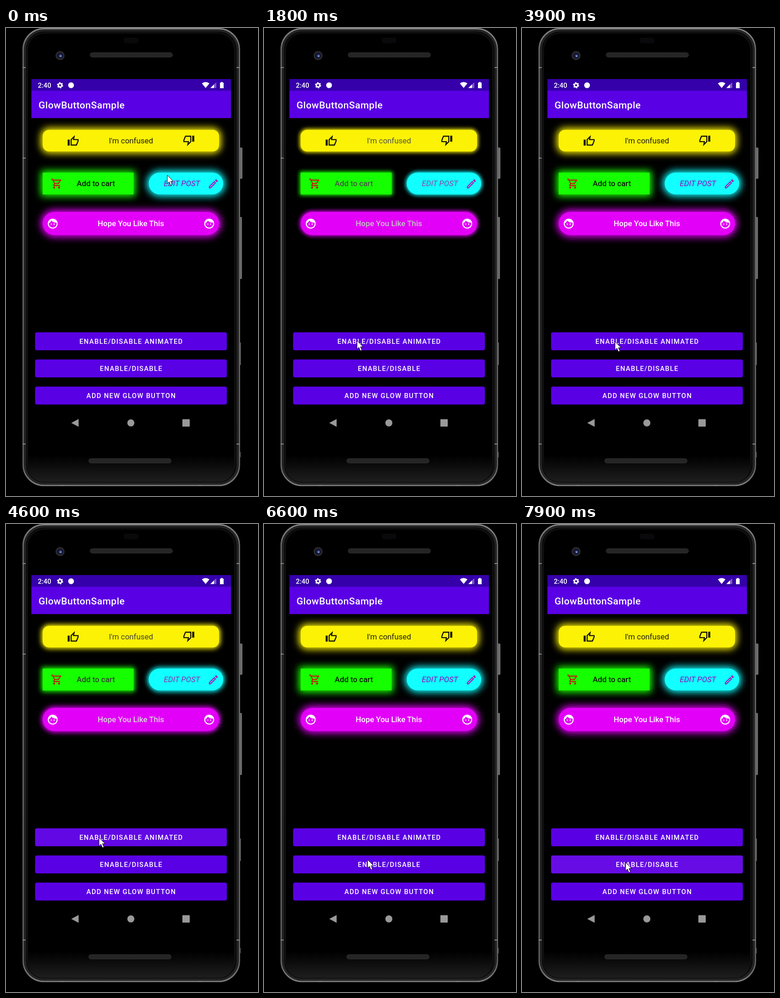
Write an HTML page that moves like this. It is 550 by 1018 pixels and loops after 8 s.

```html
<!DOCTYPE html>
<html lang="en">
<head>
<meta charset="utf-8">
<title>Glow buttons</title>
<style>
  html, body { margin: 0; width: 100%; height: 100%; overflow: hidden; background: #000; }
  svg { display: block; width: 550px; height: 1018px; }
  text { font-family: Roboto, sans-serif; white-space: pre; }
  .medium { font-weight: 500; }
  .caps { font-size: 14.8px; font-weight: 500; letter-spacing: 1.32px; fill: #fff; }
  .label { font-size: 16.9px; text-anchor: middle; }
  .line { fill: none; stroke: currentColor; stroke-width: 2; }
  .solid { fill: currentColor; }
</style>
</head>
<body>
<svg id="stage" viewBox="0 0 550 1018">
  <defs>
    <linearGradient id="chin" x1="0" y1="0" x2="0" y2="1">
      <stop offset="0" stop-color="#000"/>
      <stop offset="1" stop-color="#1f1e1f"/>
    </linearGradient>
    <linearGradient id="rim" x1="0" y1="0" x2="0" y2="1">
      <stop offset="0" stop-color="#858587"/>
      <stop offset=".05" stop-color="#666668"/>
      <stop offset=".95" stop-color="#5e5e60"/>
      <stop offset="1" stop-color="#7c7c7e"/>
    </linearGradient>
    <pattern id="mesh" width="4" height="4" patternUnits="userSpaceOnUse">
      <rect width="4" height="4" fill="#1a1a1a"/>
      <path d="M0 0h2v2H0zM2 2h2v2H2z" fill="#303030"/>
    </pattern>
    <g id="thumb">
      <path class="solid" d="M1 9h4v12H1z"/>
      <path class="line" d="M8 9l6-6-1.2 6H22v3l-3.3 8H8z"/>
    </g>
    <g id="cart">
      <path class="line" d="M1 3h2.6L8 12h7.5L20 5H5M8 12l-1.8 3.2q-.3.8.8.8h12"/>
      <circle class="solid" cx="7" cy="20" r="2"/>
      <circle class="solid" cx="17" cy="20" r="2"/>
    </g>
    <g id="pencil">
      <path class="line" d="M4 20v-2.3L14 7.6l2.3 2.3L6.3 20z"/>
      <path class="solid" d="M15.1 5.1L17 3.2q.7-.5 1.4 0l2.3 2.3q.6.7 0 1.4l-1.8 1.9z"/>
    </g>
    <g id="face">
      <circle class="line" cx="12" cy="12" r="9"/>
      <path class="solid" d="M3 11.500Q7.500 10 9.300 5.800q3.500 5.200 11 3.900A9 9 0 0 0 3 11.500z"/>
      <circle class="solid" cx="9" cy="13" r="1.25"/>
      <circle class="solid" cx="15" cy="13" r="1.25"/>
    </g>
  </defs>

  <!-- phone body -->
  <g fill="#6c6c6e">
    <rect x="509" y="260" width="7" height="68" rx="2"/>
    <rect x="509" y="411" width="6" height="135" rx="2"/>
    <rect x="509" y="684" width="3.5" height="49" rx="1"/>
    <rect x="509" y="922" width="3" height="12" rx="1"/>
  </g>
  <rect x="37.500" y="1.500" width="472" height="993.500" rx="45" fill="#0b0b0c" stroke="url(#rim)" stroke-width="3"/>
  <rect x="41.500" y="5.500" width="464" height="985.500" rx="41" fill="none" stroke="#242425" stroke-width="4"/>
  <rect x="47" y="11" width="452" height="977" rx="38" fill="#000" stroke="#1c1c1d"/>
  <path d="M48 930H498V950Q498 987 460 987H86Q48 987 48 950z" fill="url(#chin)"/>
  <path d="M36 86h7M503 86h7M36 283h7M36 905h7M503 905h7M127 995h-8M420 995h8" stroke="#888" stroke-width="2"/>
  <rect x="257" y="21" width="32" height="12" rx="5" fill="#09090c"/>
  <g fill="url(#mesh)" stroke="#2b2b2b">
    <rect x="183.5" y="53.5" width="180" height="10" rx="5"/>
    <rect x="180.5" y="936.5" width="180" height="10" rx="5"/>
  </g>
  <circle cx="118" cy="60" r="10" fill="#29292c"/>
  <circle cx="118" cy="60" r="6.5" fill="#10132a"/>
  <circle cx="118.5" cy="60.5" r="3.5" fill="#2c3c80"/>
  <circle cx="119.500" cy="61" r="1.500" fill="#a9bce8"/>

  <!-- status bar and title -->
  <rect x="55.500" y="111" width="435.500" height="26" fill="#3500aa"/>
  <rect x="55.500" y="136.500" width="435.500" height="59.500" fill="#5a00e4"/>
  <text class="medium" x="69.5" y="130" font-size="14.8" fill="#fff">2:40</text>
  <circle cx="118" cy="124.5" r="3.7" fill="none" stroke="#fff" stroke-width="3"/>
  <circle cx="118" cy="124.5" r="5.7" fill="none" stroke="#fff" stroke-width="2" stroke-dasharray="3 2.97"/>
  <circle cx="142" cy="124.5" r="6.3" fill="#fff"/>
  <path d="M427.5 120.5Q435.7 114.5 444 120.5L435.7 130.5z" fill="#fff"/>
  <path d="M446 130.5L459 118v12.5z" fill="#fff" fill-opacity=".35"/>
  <path d="M446 130.5l8-7.7v7.7z" fill="#fff"/>
  <path d="M467 119h2v-1.5h4v1.5h2v12h-8z" fill="#fff"/>
  <text class="medium" x="71" y="174.7" font-size="21.1" letter-spacing=".45" fill="#fff">GlowButtonSample</text>

  <g id="glowButtons"></g>

  <g id="actions"></g>

  <g fill="#999">
    <path d="M142.5 859l16-8.5v17z"/>
    <circle cx="272.5" cy="859" r="7.7"/>
    <rect x="385" y="851" width="16" height="16" rx="1"/>
  </g>

  <path id="cursor" d="M0 0V18.5l4.200-3.900 3.200 7.600 3.300-1.400-3.200-7.300h5.700z" fill="#fff" stroke="#000"/>
</svg>

<script>
const LOOP = 8000, STEP = 100;
const TOGGLE_DELAY = 170, TOGGLE_TIME = 1000;
const RIPPLE_GROW = 225, RIPPLE_HOLD = 300, RIPPLE_FADE = 250, RIPPLE_RADIUS = 300;
const GLOW_BLUR = 8, GLOW_SPREAD = 4;
const DISABLED = [136, 136, 136];

const glowButtons = [
  { x: 80, y: 221.5, w: 385, h: 47, r: 14, fill: '#fbf205', text: "I'm confused", tx: 272.7, ink: [34, 32, 20],
    icons: [['thumb', 146.5, 246, '#000'], ['thumb', 399, 244, '#000', 180]] },
  { x: 80, y: 314.5, w: 198.5, h: 47.5, r: 0, fill: '#16ff00', text: 'Add to cart', tx: 196, ink: [10, 25, 8], weight: 500,
    icons: [['cart', 110.5, 338.5, '#cc1010']] },
  { x: 311.5, y: 314.5, w: 162.5, h: 47.5, r: 23.75, fill: '#12ffff', text: 'EDIT POST', tx: 384, ink: [150, 0, 190], slant: 'italic',
    icons: [['pencil', 452.5, 339, '#a01cb8']] },
  { x: 80, y: 400, w: 385, h: 50.5, r: 25.25, fill: '#e300f8', text: 'Hope You Like This', tx: 272.5, ink: [255, 255, 255], weight: 500,
    icons: [['face', 102, 425.5, '#fff'], ['face', 443.5, 425.5, '#fff']] }
];

// The first action fades the glow; the second one switches it at once.
const actions = [
  { text: 'ENABLE/DISABLE ANIMATED', y: 662, touchX: 203, presses: [1130, 2650, 4100, 5400] },
  { text: 'ENABLE/DISABLE', y: 721, touchX: 226, presses: [6700, 7430], instant: true },
  { text: 'ADD NEW GLOW BUTTON', y: 780, touchX: 226, presses: [] }
];

// Cursor stops: time, x, y
const cursorPath = [
  [0, 352, 320], [900, 203, 680], [2900, 203, 680], [3500, 203, 682],
  [5900, 203, 682], [6500, 226, 730], [6800, 226, 730], [7300, 226, 736]
];

const byId = id => document.getElementById(id);
const clamp = v => Math.min(1, Math.max(0, v));
const mix = (a, b, k) => a + (b - a) * k;
const smooth = k => k * k * (3 - 2 * k);

function add(parent, tag, attrs, text = '') {
  const node = document.createElementNS('http://www.w3.org/2000/svg', tag);
  for (const name in attrs) node.setAttribute(name, attrs[name]);
  node.textContent = text;
  return parent.appendChild(node);
}

for (const b of glowButtons) {
  const group = byId('glowButtons');
  const box = { x: b.x, y: b.y, width: b.w, height: b.h, rx: b.r, fill: b.fill };
  b.glow = add(group, 'rect', { ...box, stroke: b.fill, 'stroke-linejoin': 'round' });
  add(group, 'rect', box);
  b.label = add(group, 'text', {
    class: 'label', x: b.tx, y: b.y + b.h / 2 + 5.7,
    'font-weight': b.weight || 400, 'font-style': b.slant || 'normal'
  }, b.text);
  for (const [id, x, y, color, turn = 0] of b.icons) {
    add(group, 'use', {
      href: '#' + id, color,
      transform: `translate(${x} ${y}) rotate(${turn}) scale(1.08) translate(-12 -12)`
    });
  }
}

actions.forEach((action, i) => {
  const group = byId('actions');
  const box = { x: 63.5, y: action.y, width: 418.5, height: 39, rx: 4 };
  add(group, 'rect', { ...box, fill: '#5a00e4' });
  add(add(group, 'clipPath', { id: 'area' + i }), 'rect', box);
  const clip = add(group, 'g', { 'clip-path': `url(#area${i})` });
  action.ripple = add(clip, 'circle', { cx: action.touchX, cy: action.y + 19, fill: '#8428e6' });
  add(group, 'text', { class: 'caps', x: 273.4, y: action.y + 25.2, 'text-anchor': 'middle' }, action.text);
});

function enabledAmount(t) {
  let level = 1;
  for (const { presses, instant } of actions) {
    presses.forEach((press, i) => {
      const age = t - press - TOGGLE_DELAY;
      const change = instant ? Number(age >= 0) : clamp(age / TOGGLE_TIME);
      level += i % 2 ? change : -change;
    });
  }
  return clamp(level);
}

function cursorAt(t) {
  const next = cursorPath.findIndex(stop => stop[0] > t);
  if (next < 0) return cursorPath.at(-1).slice(1);
  const [t0, x0, y0] = cursorPath[next - 1], [t1, x1, y1] = cursorPath[next];
  const k = smooth((t - t0) / (t1 - t0));
  return [mix(x0, x1, k), mix(y0, y1, k)];
}

function draw(t) {
  const level = enabledAmount(t);
  for (const b of glowButtons) {
    b.glow.style.filter = `blur(${GLOW_BLUR * level}px)`;
    b.glow.setAttribute('stroke-width', 2 * GLOW_SPREAD * level);
    b.label.setAttribute('fill', `rgb(${b.ink.map((c, i) => Math.round(mix(DISABLED[i], c, level)))})`);
  }

  for (const { presses, ripple } of actions) {
    const age = t - (presses.findLast(press => press <= t) ?? -LOOP);
    ripple.setAttribute('r', RIPPLE_RADIUS * clamp(age / RIPPLE_GROW));
    ripple.setAttribute('opacity', 1 - clamp((age - RIPPLE_HOLD) / RIPPLE_FADE));
  }

  byId('cursor').setAttribute('transform', `translate(${cursorAt(t)})`);
}

const start = performance.now();
function tick() {
  const t = (performance.now() - start) % LOOP;
  draw(Math.floor(t / STEP) * STEP);
  requestAnimationFrame(tick);
}
tick();
</script>
</body>
</html>
```
